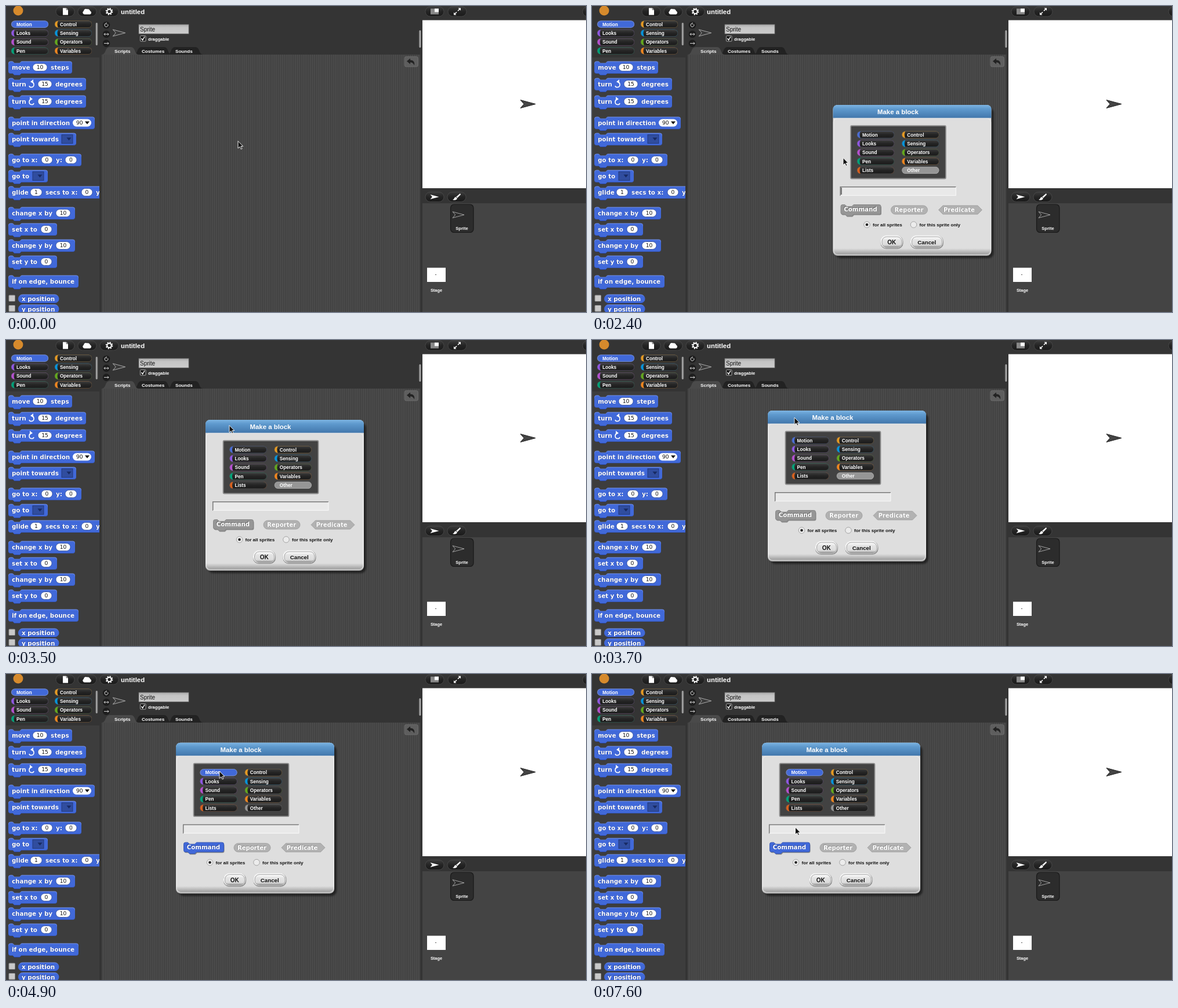
Write an HTML page that moves like this. It is 1000x529 px and loops after 8000 ms.

```html
<!DOCTYPE html>
<html lang="en">
<head>
<meta charset="utf-8">
<title>Make a block</title>
<style>
  html, body { margin: 0; width: 100%; height: 100%; overflow: hidden; background: #343434; }
  svg { display: block; width: 100vw; height: 100vh; }
  text { white-space: pre; }
  .ui { font-family: "Liberation Sans", Arial, sans-serif; }
  .code { font-family: "DejaVu Sans", Verdana, sans-serif; }
</style>
</head>
<body>
<svg id="view" viewBox="0 0 1000 529" preserveAspectRatio="none"></svg>
<script>
const LOOP = 8000, STEP = 100, OPEN_MENU = 800, OPEN_DIALOG = 2300, PICK = 4700;
const BLUE = '#4169d9';

// ---- drawing helpers ----
const rect = (x, y, w, h, fill, rx = 0, more = '') =>
  `<rect x="${x}" y="${y}" width="${w}" height="${h}" rx="${rx}" fill="${fill}" ${more}/>`;
const path = (d, fill, more = '') => `<path d="${d}" fill="${fill}" ${more}/>`;
const circle = (x, y, r, fill, more = '') => `<circle cx="${x}" cy="${y}" r="${r}" fill="${fill}" ${more}/>`;
const group = (x, y, inner, more = '') => `<g transform="translate(${x} ${y})" ${more}>${inner}</g>`;
const line = (color, width) => `stroke="${color}" stroke-width="${width}"`;
const text = (x, y, s, size, fill = '#fff', more = '') =>
  `<text class="ui" x="${x}" y="${y}" font-size="${size}" fill="${fill}" ${more}>${s}</text>`;
const bold = (x, y, s, size, fill = '#fff', more = '') =>
  text(x, y, s, size, fill, 'font-weight="bold" ' + more);
const middle = 'text-anchor="middle"';

function label(x, y, s, shade = '#2b4596', size = 10.3) {
  const one = (dx, fill) => `<text class="code" font-weight="bold" font-size="${size}" x="${x - dx}" y="${y - dx}" fill="${fill}">${s}</text>`;
  return one(.8, shade) + one(0, '#fff');
}

const gradient = (id, ...stops) =>
  `<linearGradient id="${id}" x1="0" y1="0" x2="0" y2="1">${stops.map(([o, c]) =>
    `<stop offset="${o}" stop-color="${c}"/>`).join('')}</linearGradient>`;

const defs = `<defs>
  ${gradient('bevel', [0, '#7695f0'], [.25, BLUE], [.75, BLUE], [1, '#2a459c'])}
  ${gradient('pill', [0, '#3c3c3c'], [.5, '#242424'], [1, '#1a1a1a'])}
  ${gradient('title', [0, '#7db4e2'], [.3, '#5f9ace'], [1, '#4277ac'])}
  ${gradient('body', [0, '#dedede'], [.95, '#dedede'], [1, '#8c8c8c'])}
  ${gradient('button', [0, '#fff'], [.3, '#e4e4e4'], [.75, '#dcdcdc'], [1, '#8e8e8e'])}
  ${gradient('field', [0, '#a8a8a8'], [.3, '#c4c4c4'], [1, '#cccccc'])}
  <pattern id="stripes" width="3.25" height="8" patternUnits="userSpaceOnUse">
    ${rect(0, 0, 3.25, 8, '#4c4c4c')}${rect(0, 0, .9, 8, '#393939')}
  </pattern>
  <clipPath id="palette">${rect(0, 89, 161, 440, '#000')}</clipPath>
  <filter id="soft" x="-10%" y="-10%" width="120%" height="120%"><feGaussianBlur stdDeviation="1.5"/></filter>
</defs>`;

// ---- blocks ----
const blockPath = (x, y, w, h) =>
  `M${x} ${y + 3}q0 -3 3 -3h4l3 3h9l3 -3H${x + w - 3}q3 0 3 3V${y + h - 3}q0 3 -3 3` +
  `H${x + 22}l-3 3h-9l-3 -3h-4q-3 0 -3 -3z`;

const number = (s, x, w) => y =>
  rect(x, y - 6.5, w, 13, '#fff', 6.5, line('#2c4590', .7)) +
  `<text class="code" x="${x + w / 2}" y="${y + 3.4}" font-size="9.2" fill="#111" ${middle}>${s}</text>`;
const arrowDown = (x, fill) => y => path(`M${x - 4} ${y - 2.5}h8l-4 5z`, fill);
const menuSlot = x => y =>
  rect(x, y - 7.5, 19, 15, '#304d9f', 0, line('#22397c', 1)) + arrowDown(x + 12.5, '#172a63')(y);
const angle = x => y =>
  rect(x, y - 6.5, 32, 13, '#fff', 6.5) +
  `<text class="code" x="${x + 6}" y="${y + 3.4}" font-size="9.2" fill="#111">90</text>` +
  arrowDown(x + 25, '#111')(y);
const turn = side => y => `<g transform="translate(44 ${y}) scale(${side} 1)">` +
  path('M-4 3C-3 7 4 6 4 1C4 -2 3 -3 1 -4', 'none', line('#fff', 1.6)) +
  path('M-2 -4L3 -8V-1z', '#fff') + '</g>';

// y of the middle, right edge, then words as [x, text] and slots as functions
const blocks = [
  [106, 114, [10, 'move'], number(10, 46, 25), [77, 'steps']],
  [135, 138, [10, 'turn'], turn(1), number(15, 55, 24), [85, 'degrees']],
  [165, 138, [10, 'turn'], turn(-1), number(15, 55, 24), [85, 'degrees']],
  [202, 153, [10, 'point in direction'], angle(115)],
  [230, 121, [10, 'point towards'], menuSlot(96)],
  [266, 130, [10, 'go to x:'], number(0, 61, 19), [86, 'y:'], number(0, 102, 20)],
  [294, 72, [10, 'go to'], menuSlot(46)],
  [322, 200, [10, 'glide'], number(1, 42, 20), [68, 'secs to x:'], number(0, 130, 19), [155, 'y:']],
  [358, 119, [10, 'change x by'], number(10, 86, 25)],
  [386, 88, [10, 'set x to'], number(0, 60, 19)],
  [414, 119, [10, 'change y by'], number(10, 86, 25)],
  [442, 88, [10, 'set y to'], number(0, 60, 19)],
  [476, 125, [10, 'if on edge, bounce']]
];

const drawBlock = ([y, right, ...parts]) =>
  path(blockPath(4.5, y - 10, right - 5, 20.5), BLUE, 'stroke="url(#bevel)"') +
  parts.map(p => typeof p === 'function' ? p(y) : label(p[0], y + 4.3, p[1])).join('');

const reporter = (y, s) =>
  rect(5, y - 6, 10.5, 10.5, '#c9c9c9', 1, line('#8a8a8a', 1)) +
  rect(21.5, y - 7, 69.5, 14.5, BLUE, 7, 'stroke="url(#bevel)"') + label(27, y + 4, s);

// ---- category buttons ----
const colors = {
  Motion: '#4a6cd4', Looks: '#8f56e3', Sound: '#b550d0', Pen: '#00a178', Lists: '#d9601d',
  Control: '#e69a22', Sensing: '#0494dc', Operators: '#62a81c', Variables: '#f3861d', Other: '#969696'
};
const columns = [['Motion', 'Looks', 'Sound', 'Pen', 'Lists'],
                 ['Control', 'Sensing', 'Operators', 'Variables', 'Other']];

function category(name, x, y, on) {
  const c = colors[name];
  return rect(x, y - 6, 64, 12, c, 6) +
    path(`M${x + 6} ${y - 6}h52a6 6 0 0 1 0 12h-52q-3 -6 0 -12z`, on ? (name === 'Motion' ? BLUE : c) : 'url(#pill)') +
    rect(x + .3, y - 5.7, 63.4, 11.4, 'none', 5.7, `stroke="${on ? '#bbb' : '#5a5a5a'}" stroke-width=".6" stroke-opacity=".7"`) +
    bold(x + 9, y + 3, name, 8.2);
}
const categories = (x, y, gap, rows, selected) => columns.map((names, i) =>
  names.slice(0, rows).map((n, j) => category(n, x + gap * i, y + 15.35 * j, n === selected)).join('')).join('');

// ---- window parts ----
const toolButton = (x, y, icon) =>
  rect(x - 16, y - 8.5, 32, 17, 'url(#pill)', 8.5, line('#4c4c4c', .8)) + group(x, y, icon);
const spriteArrow = (x, y, fill, stroke, k = 1) =>
  `<path transform="translate(${x} ${y}) scale(${k})" d="M-13 -7L13 0L-13 7L-7 0z" fill="${fill}" stroke="${stroke}" stroke-width="1"/>`;
const back = 'M-7 -1L-1 -6V-3C5 -3 7 1 6 6C4 2 2 1 -1 1V4z';
const tab = (x, w, s, fill, tx) =>
  path(`M${x} 84C${x + 8} 84 ${x + 5} 71 ${x + 14} 71H${x + w - 14}C${x + w - 5} 71 ${x + w - 8} 84 ${x + w} 84z`, fill) +
  bold(tx, 81, s, 8.1);
const handle = (x, y, h) => rect(x, y, 4.5, h, '#5b5b5b', 2) + rect(x + 1.5, y, 1.8, h, '#b8b8b8', 1);

const pageIcon = path('M-4 -6H2L5 -3V6H-4z', '#fff') + path('M2 -6V-3H5', 'none', line('#444', .8));
const cloudIcon = path('M-5 5a3.2 3.2 0 0 1 -1 -6a4 4 0 0 1 6 -3a4 4 0 0 1 5 3a3.2 3.2 0 0 1 0 6z', '#fff');
const gearIcon = circle(0, 0, 3.7, 'none', line('#fff', 2)) +
  circle(0, 0, 5.4, 'none', line('#fff', 1.8) + ' stroke-dasharray="2.12 2.12"');
const sizeIcon = rect(-7, -5, 14, 10, '#888') + rect(0, -5, 7, 6, '#fff');
const fullIcon = path('M1 -1L5 -5M-1 1L-5 5', 'none', line('#fff', 1.6)) +
  path('M1.5 -6H6V-1.5zM-1.5 6H-6V1.5z', '#fff');
const brushIcon = path('M6 -6L-1 0L1 2L7 -4z', '#fff') + path('M-2 0L1 3C-1 6 -4 6 -7 5C-4 4 -4 1 -2 0z', '#fff');

const toolbar =
  circle(21, 8, 8.5, '#d68a2c') +
  toolButton(102, 9.5, pageIcon) + toolButton(140, 9.5, cloudIcon) + toolButton(178, 9.5, gearIcon) +
  bold(198, 14, 'untitled', 11.4) +
  toolButton(739, 9.5, sizeIcon) + toolButton(778, 9.5, fullIcon) + toolButton(1010, 9.5, '');

const turnGlyph = [
  path('M2.5 -1.5A3 3 0 1 1 -1 -2.8M0 -4.5V-1', 'none', line('#ddd', 1)),
  path('M-4 0H4M-2 -2L-4 0L-2 2M2 -2L4 0L2 2', 'none', line('#ddd', 1)),
  path('M-4 0H4M2 -2L4 0L2 2', 'none', line('#ddd', 1))
];
const spriteBar =
  turnGlyph.map((g, i) => group(173, 33 + 15.8 * i, circle(0, 0, 6.3, '#1d1d1d') + g)).join('') +
  spriteArrow(195, 46.5, '#3a3a3a', '#c8c8c8', .82) +
  rect(229, 32, 86, 16, 'url(#field)', 0, line('#787878', .8)) + text(231, 43.5, 'Sprite', 10, '#111') +
  rect(231.5, 51.5, 9.5, 9.5, '#1c1c1c', 1, line('#aaa', 1)) +
  path('M233.5 56L235.5 59L239 53', 'none', line('#fff', 1.4)) +
  bold(245, 59.5, 'draggable', 7.6) +
  tab(278, 62, 'Sounds', '#222', 292) + tab(220, 66, 'Costumes', '#222', 234) +
  tab(165, 64, 'Scripts', '#4a4a4a', 187);

const corral =
  rect(718, 341, 282, 188, '#444') +
  toolButton(739, 330, spriteArrow(0, 0, '#fff', 'none', .58)) + toolButton(777, 330, brushIcon) +
  rect(766.5, 343, 39.5, 48.5, '#2c2c2c', 6, line('#191919', 1.2)) +
  spriteArrow(780, 361, '#2c2c2c', '#c8c8c8', .76) +
  bold(786, 386.5, 'Sprite', 7.5, '#fff', middle) +
  rect(726, 452.5, 32, 24.5, '#fff') + rect(740, 464, 2, 1, '#555') +
  bold(742, 494, 'Stage', 7.4, '#fff', middle);

const scene =
  rect(0, 0, 1000, 529, '#343434') + rect(0, 89, 161, 440, '#3d3d3d') +
  rect(165, 84, 549, 445, 'url(#stripes)') +
  toolbar + categories(9, 31.5, 75, 4, 'Motion') + handle(154, 29, 39) +
  `<g clip-path="url(#palette)">${blocks.map(drawBlock).join('')}${reporter(506, 'x position')}${reporter(523.5, 'y position')}</g>` +
  spriteBar + handle(711.5, 42, 30) +
  rect(687, 87.5, 23.5, 17.5, '#5e5e5e', 3, line('#707070', .8)) + group(698, 96.5, path(back, '#222')) +
  rect(718, 24.5, 282, 290.5, '#fff') + spriteArrow(900, 169.5, '#444', '#222') + corral;

// ---- context menu ----
const items = [['undrop', 238, 250.5, 426], ['clean up', 252.5, 263.5, 407], ['add comment', 263.5, 275, 407],
               ['scripts pic...', 275, 286.5, 407], ['make a block...', 288, 300.5, 407]];
const menu =
  rect(405, 239, 79, 66, '#000', 4, 'opacity=".45"') +
  rect(402.5, 236, 78, 66, '#fff', 4, line('#4a4a4a', 1.5)) +
  rect(403.5, 288, 76, 12.5, '#bcbcbc', 0, 'id="choice"') +
  rect(403, 251, 77, .8, '#777') + rect(403, 286.8, 77, .8, '#777') +
  group(414.5, 244, path(back, '#222')) + text(462, 247.5, '^Z', 9.7, '#111') +
  items.map(([s, top, end, x]) => text(x, (top + end) / 2 + 3.3, s, 9.7, '#111')).join('');

// ---- dialog ----
const pushButton = (x, w, s, size) =>
  rect(x, 226, w, 23, '#8b8b8b', 10) + rect(x, 225.5, w - 1, 22, '#f6f6f6', 10) +
  rect(x + 2.5, 228, w - 5, 18.5, 'url(#button)', 8, line('#999', .9)) +
  bold(x + w / 2 - .3, 241, s, size, '#111', middle);
const radio = (x, s, on) =>
  circle(x, 207, 5.3, '#ececec', line('#a5a5a5', 1)) +
  (on ? circle(x, 207, 2.3, '#222') : '') + bold(x + 10, 210.3, s, 8.1, '#111');
const commandBlock = (fill, shade, edge) =>
  path(blockPath(14.5, 174.5, 69, 16), '#666', 'opacity=".7"') +
  path(blockPath(13.5, 172.5, 69, 16.5), fill, line(edge, 1)) + label(18.8, 184, 'Command', shade, 10.2);
const choices = (selected, block) =>
  categories(41.5, 51.5, 77.3, 5, selected) + block;

const dialog =
  rect(4, 5, 273, 260, '#000', 9, 'opacity=".5" filter="url(#soft)"') +
  rect(0, 0, 273, 261, 'url(#body)', 8) +
  rect(1, 23, 271, 236, 'none', 7, 'stroke="#f2f2f2" stroke-opacity=".6" stroke-width="1.5"') +
  path('M0 22.5V8q0 -8 8 -8H265q8 0 8 8V22.5z', 'url(#title)') +
  bold(112, 16, 'Make a block', 11.4, '#fff', middle) +
  rect(30.5, 36, 164, 91.5, '#424242', 2, line('#8e8e8e', 1.8)) +
  rect(12, 141, 200, 16, '#e9e9e9') +
  path('M12.7 157V141.8H212', 'none', line('#777', 1.5)) + path('M13 156.6H212V142', 'none', line('#f8f8f8', 1)) +
  rect(14, 143, 1, 12, '#111', 0, 'id="caret"') +
  rect(100, 174, 63, 15, '#b2b2b2', 7.5, line('#999', .8)) + label(106, 185.3, 'Reporter', '#8c8c8c', 10) +
  path('M182 181.5L189.5 174H249.5L257 181.5L249.5 189H189.5z', '#b2b2b2', line('#999', .8)) +
  label(190.5, 185.3, 'Predicate', '#8c8c8c', 10) +
  radio(58.5, 'for all sprites', true) + radio(139, 'for this sprite only', false) +
  pushButton(82, 39, 'OK', 10) + pushButton(133.5, 57, 'Cancel', 9.8) +
  `<g id="before">${choices('Other', commandBlock('#969696', '#666', '#858585'))}</g>` +
  `<g id="after">${choices('Motion', commandBlock(BLUE, '#2b4596', '#3355b5'))}</g>`;

const pointer = path('M0 0V12.5L3 9.8L5.1 14L7 13.1L5 9H8.8z', '#111', line('#fff', .9) + ' stroke-linejoin="round"');

document.getElementById('view').innerHTML = defs + scene +
  `<g id="menu">${menu}</g><g id="dialog">${dialog}</g><g id="pointer">${pointer}</g>`;

// ---- motion ----
const pointerTrack = [
  [1000, 400, 233.5], [1600, 420, 290], [2200, 420, 290], [2600, 446, 235], [2700, 446, 235],
  [2900, 469, 188], [3000, 469, 188], [3400, 397, 154], [3500, 385, 147.5], [3600, 362, 139],
  [3700, 349, 134], [3800, 345, 132.5], [4100, 345, 132.5], [4700, 368, 168], [5200, 368, 168],
  [5500, 404, 240], [5800, 351, 293], [6000, 351, 293], [6300, 360, 286], [6600, 360, 286], [7100, 350.5, 265]
];
const dialogTrack = [
  [3000, 415.5, 171], [3500, 344, 138], [3600, 322, 129], [3700, 303, 122], [3800, 294, 119.3], [3900, 293, 118.7]
];

function along(track, t) {
  const i = track.findIndex(k => k[0] > t);
  if (i === 0) return track[0].slice(1);
  if (i < 0) return track[track.length - 1].slice(1);
  const [t0, x0, y0] = track[i - 1], [t1, x1, y1] = track[i];
  const u = (t - t0) / (t1 - t0);
  return [x0 + (x1 - x0) * u, y0 + (y1 - y0) * u];
}

const $ = id => document.getElementById(id);
const show = (id, on) => $(id).setAttribute('display', on ? 'inline' : 'none');
const place = (id, [x, y]) => $(id).setAttribute('transform', `translate(${x} ${y})`);

function draw(time) {
  const t = Math.floor(time % LOOP / STEP) * STEP;
  const spot = along(pointerTrack, t);
  place('pointer', spot);
  place('dialog', along(dialogTrack, t));

  show('menu', t >= OPEN_MENU && t < OPEN_DIALOG);
  const hit = items.find(([, top, end]) => spot[0] > 403 && spot[1] >= top && spot[1] <= end);
  show('choice', hit);
  if (hit) {
    $('choice').setAttribute('y', hit[1]);
    $('choice').setAttribute('height', hit[2] - hit[1]);
  }

  show('dialog', t >= OPEN_DIALOG);
  show('before', t < PICK);
  show('after', t >= PICK);
  const blink = t >= PICK && t % 1000 < 500;
  show('caret', blink || (t >= OPEN_DIALOG && t < 2800));
}

function tick() {
  draw(performance.now());
  requestAnimationFrame(tick);
}
tick();
</script>
</body>
</html>
```
